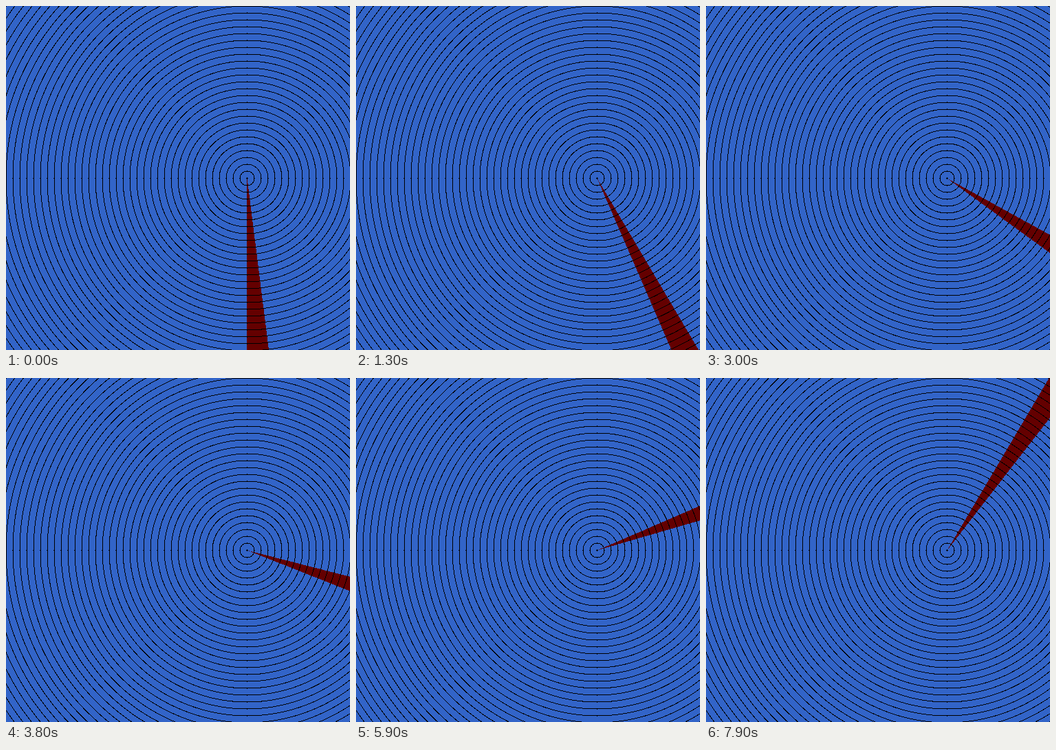
Animation of 500x500 px, one loop 8000 ms. Source, as an HTML page with a canvas:

```html
<!DOCTYPE html>
<html lang="en">
<head>
<meta charset="utf-8">
<title>Sweeping beam</title>
<style>
  html, body { margin: 0; width: 100%; height: 100%; overflow: hidden; background: rgb(50, 100, 200); }
  canvas { display: block; width: 500px; height: 500px; }
</style>
</head>
<body>
<canvas id="stage" width="500" height="500"></canvas>
<script>
const SIZE = 500, CENTER_X = 350, CENTER_Y = 250;
const RING_GAP = 10, RING_WIDTH = 1;
const STEP_MS = 100, STEPS = 80;
const HALF_TURN_STEPS = 100, BEAM_STEPS = 4;

const ctx = document.getElementById('stage').getContext('2d');
const image = ctx.createImageData(SIZE, SIZE);
const pixels = new Uint32Array(image.data.buffer);

// Little-endian pixel order: alpha, blue, green, red.
const rgb = (r, g, b) => (255 << 24 | b << 16 | g << 8 | r) >>> 0;
const BLACK = rgb(0, 0, 0), BLUE = rgb(50, 100, 200), RED = rgb(100, 0, 0);

// Direction of each pixel in sweep steps, counter-clockwise from straight down.
const direction = new Float64Array(SIZE * SIZE);
const onRing = new Uint8Array(SIZE * SIZE);
for (let y = 0, i = 0; y < SIZE; y++) {
  for (let x = 0; x < SIZE; x++, i++) {
    const dx = x - CENTER_X, dy = y - CENTER_Y;
    direction[i] = Math.atan2(dx, dy) * HALF_TURN_STEPS / Math.PI;
    onRing[i] = Math.sqrt(dx * dx + dy * dy) % RING_GAP <= RING_WIDTH ? 1 : 0;
  }
}

function draw(step) {
  for (let i = 0; i < pixels.length; i++) {
    const inBeam = direction[i] >= step && direction[i] <= step + BEAM_STEPS;
    pixels[i] = onRing[i] ? BLACK : inBeam ? RED : BLUE;
  }
  ctx.putImageData(image, 0, 0);
}

const start = performance.now();
let shown = -1;
function tick() {
  const step = Math.floor((performance.now() - start) / STEP_MS) % STEPS;
  if (step !== shown) draw(shown = step);
  requestAnimationFrame(tick);
}
tick();
</script>
</body>
</html>
```
